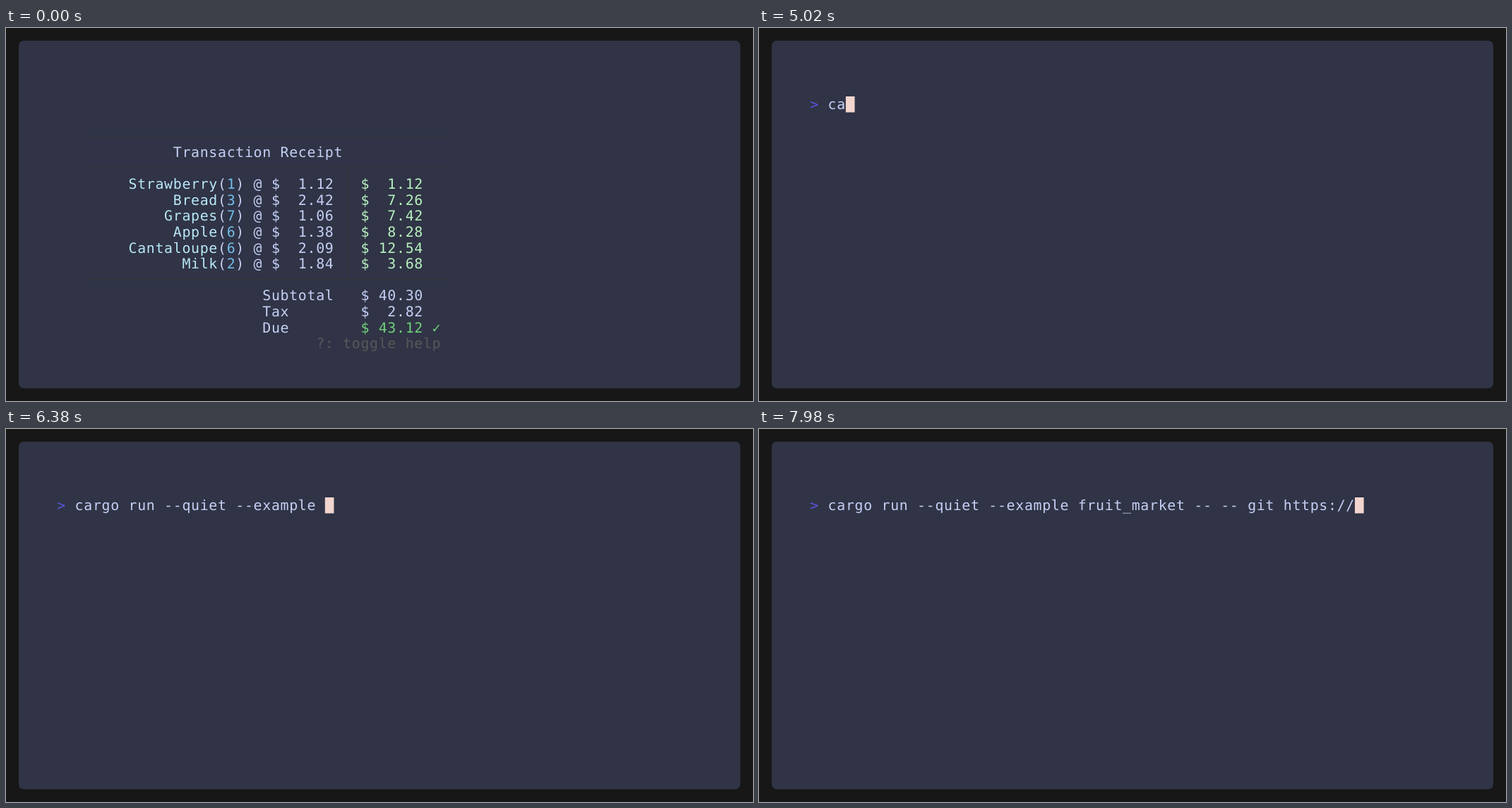
An HTML page with a canvas for the animation above (8000 ms loop, 1058 by 529 pixels).

```html
<!DOCTYPE html>
<html lang="en">
<head>
<meta charset="utf-8">
<title>Terminal</title>
<style>
  html, body { margin: 0; width: 100%; height: 100%; overflow: hidden; background: #171717; }
  canvas { display: block; }
</style>
</head>
<body>
<canvas id="stage" width="1058" height="529"></canvas>
<script>
const ctx = document.getElementById('stage').getContext('2d');
const LOOP = 8000;
const CELL = { w: 12.65, h: 22.6, left: 72.3, top: 97, baseline: 18.1 };
const COLOR = {
  margin: '#171717', screen: '#303446', text: '#c6d0f5', prompt: '#5a56e0', cursor: '#f2d5cf',
  item: '#b8e8f8', count: '#70bce6', amount: '#b8f0be', due: '#70d07a', rule: '#37383b', help: '#585858'
};
const COMMAND = 'cargo run --quiet --example fruit_market -- -- git https://';
const ITEMS = [
  ['Strawberry', 1, 1.12], ['Bread', 3, 2.42], ['Grapes', 7, 1.06],
  ['Apple', 6, 1.38], ['Cantaloupe', 6, 2.09], ['Milk', 2, 1.84]
];

const colX = col => CELL.left + col * CELL.w;
const rowY = row => CELL.top + row * CELL.h;
const money = value => '$' + value.toFixed(2).padStart(6);

function print(col, row, text, color = COLOR.text) {
  ctx.fillStyle = color;
  [...text].forEach((char, i) => {
    if (char !== ' ') ctx.fillText(char, colX(col + i), rowY(row) + CELL.baseline);
  });
}

function drawRule(row) {
  ctx.fillStyle = COLOR.rule;
  ctx.fillRect(colX(3), Math.floor(rowY(row + 0.5)), 41 * CELL.w, 1);
}

function drawReceipt() {
  [2, 4, 11].forEach(drawRule);
  ctx.fillRect(Math.floor(colX(32.5)), rowY(4.5), 1, 7 * CELL.h);
  print(13, 3, 'Transaction Receipt');

  let subtotal = 0;
  ITEMS.forEach(([name, count, price], i) => {
    const row = 5 + i;
    print(18 - name.length, row, name, COLOR.item);
    print(18, row, '( ) @ ' + money(price));
    print(19, row, String(count), COLOR.count);
    print(34, row, money(count * price), COLOR.amount);
    subtotal += count * price;
  });

  const tax = subtotal * 0.07;
  print(23, 12, 'Subtotal');
  print(34, 12, money(subtotal));
  print(23, 13, 'Tax');
  print(34, 13, money(tax));
  print(23, 14, 'Due');
  print(34, 14, money(subtotal + tax) + ' ✓', COLOR.due);
  print(29, 15, '?: toggle help', COLOR.help);
}

function drawPrompt(row, typed, cursorOn) {
  print(0, row, '>', COLOR.prompt);
  print(2, row, typed);
  if (!cursorOn) return;
  ctx.fillStyle = COLOR.cursor;
  ctx.fillRect(colX(2 + typed.length), rowY(row), CELL.w, CELL.h);
}

const between = (t, from, to) => t >= from && t < to;

function draw(time) {
  // The terminal refreshes every 40 ms.
  const t = Math.floor((time - 20) / 40) * 40 + 20;

  ctx.fillStyle = COLOR.margin;
  ctx.fillRect(0, 0, 1058, 529);
  ctx.fillStyle = COLOR.screen;
  ctx.beginPath();
  ctx.roundRect(18, 18, 1022, 493, 7);
  ctx.fill();

  if (t < 500) {
    drawReceipt();
  } else if (t < 2020) {
    print(0, 0, 'Shutting down...');
    if (t >= 540) drawPrompt(1, '', !between(t, 1140, 1740));
  } else if (t >= 2060) {
    const length = Math.max(0, Math.floor((t - 4927.5) / 52.5) + 1);
    const blinkedOff = between(t, 2620, 3220) || between(t, 3780, 4380);
    drawPrompt(0, COMMAND.slice(0, length), !blinkedOff);
  }
}

ctx.font = '19.88px "DejaVu Sans Mono", monospace';
ctx.textRendering = 'geometricPrecision';

const start = performance.now();
function tick() {
  draw((performance.now() - start) % LOOP);
  requestAnimationFrame(tick);
}
tick();
</script>
</body>
</html>
```
